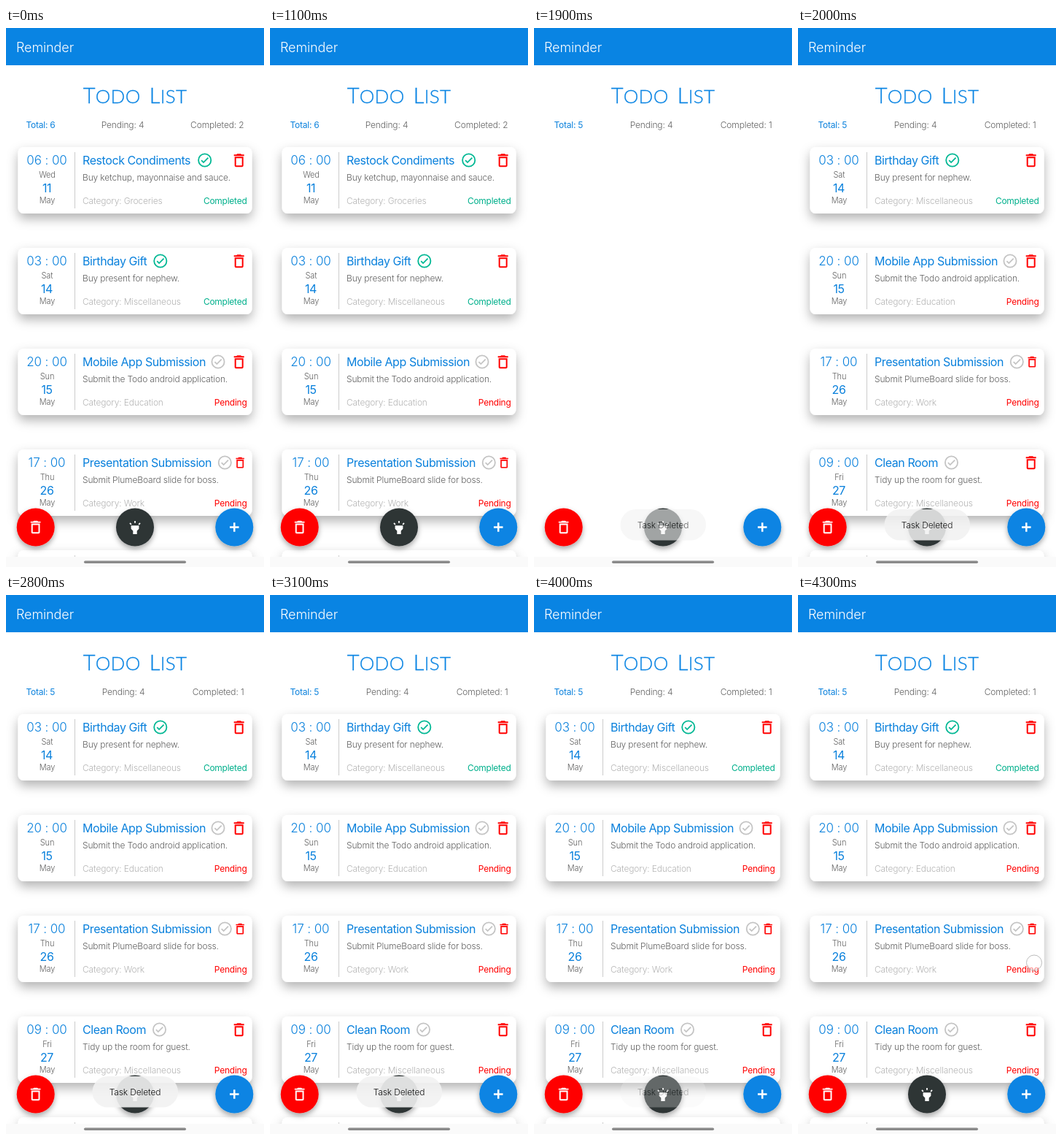
An HTML page for the animation above (4400 ms loop, 354 by 738 pixels).

```html
<!DOCTYPE html>
<html lang="en">
<head>
<meta charset="utf-8">
<title>Reminder</title>
<style>
  html, body { margin: 0; width: 100%; height: 100%; overflow: hidden; background: #fff; }
  svg { display: block; width: 100vw; height: 100vh; }
  text { font: 300 12px Inter, Roboto, sans-serif; letter-spacing: -.14px; fill: #606060; }
  .bar { font-size: 18px; letter-spacing: -.1px; fill: #fff; }
  .head { font: 300 29px Lato, sans-serif; letter-spacing: .3px; word-spacing: 4px; fill: #0984e3; stroke: #0984e3; stroke-width: .3px; }
  .head .cap { font-size: 29px; }
  .head .small { font-size: 26px; }
  .title, .day { font-size: 16px; font-weight: 400; letter-spacing: -.42px; fill: #0980dc; }
  .time { font-size: 17px; letter-spacing: -.1px; fill: #0980dc; }
  .date { font-size: 11px; }
  .blue { fill: #0980dc; }
  .pale { fill: #b4b4b4; }
  .blue, .done, .due { font-weight: 400; letter-spacing: -.25px; }
  .done { fill: #00b08c; }
  .due { fill: #f00; }
  .note { fill: #111; }
  .mid { text-anchor: middle; }
  .end { text-anchor: end; }
</style>
</head>
<body>
<svg viewBox="0 0 354 738" xmlns="http://www.w3.org/2000/svg">
  <defs>
    <filter id="lift" x="-12%" y="-40%" width="124%" height="200%">
      <feDropShadow dx="0" dy="7" stdDeviation="7.5" flood-color="#000" flood-opacity=".3"/>
    </filter>
    <filter id="float" x="-40%" y="-40%" width="180%" height="190%">
      <feDropShadow dx="0" dy="3.5" stdDeviation="3.5" flood-color="#000" flood-opacity=".35"/>
    </filter>
    <path id="bin" d="M-6 7c0 1.1.9 2 2 2h8c1.1 0 2-.9 2-2V-5H-6zM-4-3h8V7h-8zM3.5-8l-1-1h-5l-1 1H-7v2H7v-2z" fill-rule="evenodd"/>
    <g id="tick" fill="none" stroke-width="1.8">
      <circle r="8.6"/>
      <path d="M-4.6.2L-1.7 3.1 4.7-3.3"/>
    </g>
    <path id="torch" d="M-6 2l3 3v5h6v-5l3-3v-5H-6zM-1-10h2v3h-2zM-8.5-6.1l1.4-1.4 2.1 2.1-1.4 1.4zM5-5.4l2.1-2.1 1.4 1.4L6.4-4z"/>
  </defs>
  <rect width="354" height="738" fill="#fff"/>
  <g id="before"></g>
  <g id="after"></g>
  <rect width="354" height="51" fill="#0984e3"/>
  <text class="bar" x="14" y="33">Reminder</text>
  <text class="head mid" x="177" y="103"><tspan class="cap">T</tspan><tspan class="small">ODO</tspan> <tspan class="cap">L</tspan><tspan class="small">IST</tspan></text>
  <text id="total" class="blue" x="27.5" y="136.5"></text>
  <text id="pending" class="mid" y="136.5"></text>
  <text id="completed" class="end" x="326.5" y="136.5"></text>
  <g id="buttons"></g>
  <rect y="724" width="354" height="14" fill="#fafafa"/>
  <rect x="107" y="729.5" width="140" height="3.4" rx="1.7" fill="#8a8a8a"/>
  <g id="toast">
    <rect x="118.5" y="659" width="117.5" height="42.5" rx="21" fill="#f2f2f2" fill-opacity=".9"/>
    <text class="note mid" x="177" y="685">Task Deleted</text>
  </g>
  <circle id="touch" r="10.5" fill="#fff" fill-opacity=".65" stroke="#aaa" stroke-width="1"/>
</svg>
<script>
const LOOP = 4400, STEP = 100, PITCH = 138;
const $ = id => document.getElementById(id);

const task = (time, weekday, day, title, tickX, detail, category, done, narrow) =>
  ({ time, weekday, day, title, tickX, detail, category, done, narrow });

const tasks = [
  task('06 : 00', 'Wed', 11, 'Restock Condiments', 272.7, 'Buy ketchup, mayonnaise and sauce.', 'Groceries', true),
  task('03 : 00', 'Sat', 14, 'Birthday Gift', 211.8, 'Buy present for nephew.', 'Miscellaneous', true),
  task('20 : 00', 'Sun', 15, 'Mobile App Submission', 291, 'Submit the Todo android application.', 'Education', false),
  task('17 : 00', 'Thu', 26, 'Presentation Submission', 300.3, 'Submit PlumeBoard slide for boss.', 'Work', false, true),
  task('09 : 00', 'Fri', 27, 'Clean Room', 210.5, 'Tidy up the room for guest.', 'Miscellaneous', false)
];

const label = (cls, x, y, str) => `<text class="${cls}" x="${x}" y="${y}">${str}</text>`;
const icon = (id, x, y, scale, paint) =>
  `<use href="#${id}" transform="translate(${x} ${y}) scale(${scale})" ${paint}/>`;

function details(t) {
  return label('time mid', 56, 24, t.time)
    + label('date mid', 56.5, 42, t.weekday)
    + label('day mid', 56, 62, t.day)
    + label('date mid', 56.5, 77, 'May')
    + label('title', 105, 24, t.title)
    + label('', 105, 46, t.detail)
    + label('pale', 105, 77.5, 'Category: ' + t.category)
    + label((t.done ? 'done' : 'due') + ' end', 330.5, 77.5, t.done ? 'Completed' : 'Pending')
    + icon('tick', t.tickX, 18, 1, `stroke="${t.done ? '#00b894' : '#c4c4c4'}"`)
    + icon('bin', t.narrow ? 321.2 : 319.7, 18.2, t.narrow ? .82 : 1, 'fill="#f00"');
}

function card(t, i) {
  return `<g transform="translate(0 ${163 + i * PITCH})">
    <rect x="16.5" width="321" height="91" rx="8" fill="#fff" filter="url(#lift)"/>
    <path d="M94.5 7V84" stroke="#ccc"/>${t ? details(t) : ''}</g>`;
}

function button(x, color, mark) {
  return `<circle cx="${x}" cy="683.5" r="26" fill="${color}" filter="url(#float)"/>${mark}`;
}

// The last card only peeks out above the navigation bar.
$('before').innerHTML = [...tasks.slice(0, 4), null].map(card).join('');
$('after').innerHTML = [...tasks.slice(1), null].map(card).join('');
$('buttons').innerHTML =
  button(40.7, '#f00', icon('bin', 40.6, 683.5, .98, 'fill="#fff"'))
  + button(177, '#2d3436', icon('torch', 177, 684, .9, 'fill="#fff"'))
  + button(313.3, '#0984e3', '<path d="M307 683.5h12.6M313.3 677.2v12.6" stroke="#fff" stroke-width="2.5"/>');

const show = (id, on) => $(id).setAttribute('visibility', on ? 'visible' : 'hidden');
const fade = (id, alpha) => $(id).setAttribute('opacity', alpha);

function toastAlpha(t) {
  if (t < 1800 || t >= 4100) return 0;
  if (t < 2100) return [.08, .65, .95][(t - 1800) / STEP];
  if (t < 3800) return 1;
  return [.97, .7, .3][(t - 3800) / STEP];
}

function touchAlpha(t) {
  if (t >= 4300) return .8;
  return { 1600: .8, 1700: 1, 1800: .5 }[t] || 0;
}

function draw(ms) {
  const t = Math.floor(ms % LOOP / STEP) * STEP;
  const deleted = t >= 1800;
  show('before', t < 1900);
  show('after', t >= 2000);
  $('total').textContent = 'Total: ' + (deleted ? 5 : 6);
  $('pending').textContent = 'Pending: 4';
  $('pending').setAttribute('x', deleted ? 161 : 160);
  $('completed').textContent = 'Completed: ' + (deleted ? 1 : 2);
  fade('toast', toastAlpha(t));
  fade('touch', touchAlpha(t));
  $('touch').setAttribute('transform', t < 3000 ? 'translate(313.5 181)' : 'translate(324 503.5)');
}

function tick() {
  draw(performance.now());
  requestAnimationFrame(tick);
}
tick();
</script>
</body>
</html>
```
